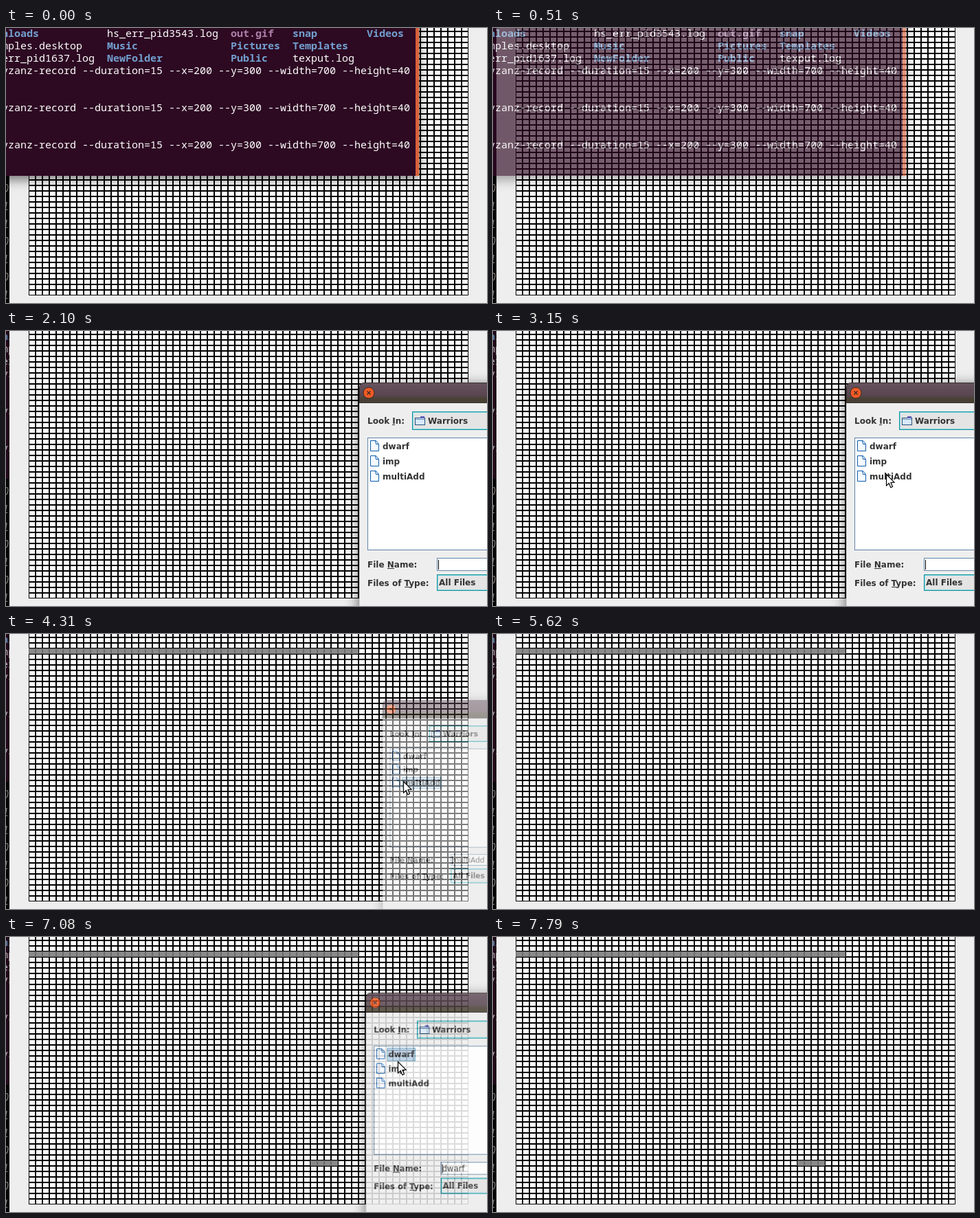
An HTML page with a canvas for the animation above (8 s loop, 700x400 px).

```html
<!DOCTYPE html>
<html lang="en">
<head>
<meta charset="utf-8">
<title>Memory grid and file chooser</title>
<style>
html, body { margin: 0; width: 100%; height: 100%; overflow: hidden; background: #eee; }
canvas { display: block; }
</style>
</head>
<body>
<canvas id="stage" width="700" height="400"></canvas>
<script>
const ctx = document.getElementById('stage').getContext('2d');
const LOOP = 8000;
const MONO = '15px "Noto Sans Mono", monospace';
const BOLD = 'bold 12px "DejaVu Sans", sans-serif';
const PLAIN = '12px "DejaVu Sans", sans-serif';

function layer(height, paint) {
  const canvas = document.createElement('canvas');
  canvas.width = 700;
  canvas.height = height;
  const g = canvas.getContext('2d');
  if (paint) paint(g);
  return canvas;
}

function rect(g, x, y, w, h, fill) {
  g.fillStyle = fill;
  g.fillRect(x, y, w, h);
}

function frame(g, x, y, w, h, line, fill) {
  rect(g, x, y, w, h, line);
  rect(g, x + 1, y + 1, w - 2, h - 2, fill);
}

function label(g, str, x, y, font, color) {
  g.font = font;
  g.fillStyle = color;
  g.fillText(str, x, y);
}

function shadow(g, color, blur, dy) {
  g.shadowColor = color;
  g.shadowBlur = blur;
  g.shadowOffsetY = dy;
}

function polygon(g, points) {
  g.beginPath();
  points.forEach(([x, y]) => g.lineTo(x, y));
  g.closePath();
}

// Terminal window; text sits on a 9 px character grid.
const DIR = '#729fcf', MEDIA = '#ad7fa8', WHITE = '#ffffff';
const COMMAND = 'yzanz-record --duration=15 --x=200 --y=300 --width=700 --height=40';
const terminalText = [
  [0, 13, 'nloads', DIR], [17, 13, 'hs_err_pid3543.log', WHITE], [37, 13, 'out.gif', MEDIA],
  [47, 13, 'snap', DIR], [59, 13, 'Videos', DIR],
  [0, 31, 'mples.desktop', WHITE], [17, 31, 'Music', DIR], [37, 31, 'Pictures', DIR], [47, 31, 'Templates', DIR],
  [0, 49, 'err_pid1637.log', WHITE], [17, 49, 'NewFolder', DIR], [37, 49, 'Public', DIR], [47, 49, 'texput.log', WHITE],
  [0, 67, COMMAND, WHITE], [0, 121, COMMAND, WHITE], [0, 175, COMMAND, WHITE]
];

const terminal = layer(400, g => {
  shadow(g, 'rgba(0,0,0,.55)', 16, 5);
  rect(g, -30, -30, 631, 245, '#2d0922');
  shadow(g, 'transparent', 0, 0);
  rect(g, 596, 0, 5, 215, '#d8603a');
  for (const [col, y, str, color] of terminalText) {
    label(g, str, -6 + col * 9, y, (color === WHITE ? '' : 'bold ') + MONO, color);
  }
});

// Grid of 10 x 8 cells, each with its own 1 px border.
const GRID_X = 33, ROW_Y = 21;

function cells(g, col, row, count, line, fill) {
  for (let i = col; i < col + count; i++) {
    frame(g, GRID_X + i * 10, ROW_Y + row * 8, 10, 8, line, fill);
  }
}

const backdrop = layer(400, g => {
  rect(g, 0, 0, 700, 400, '#000');
  ['0', '1', '1', '0', '1', '0', '1'].forEach((digit, i) => {
    label(g, digit, -5, 239 + i * 25.8, 'italic 15px "DejaVu Sans", sans-serif', '#a9a09c');
  });
  g.drawImage(terminal, 0, 0);
  shadow(g, 'rgba(0,0,0,.75)', 16, 3);
  rect(g, 5, -30, 720, 460, '#eee');
  shadow(g, 'transparent', 0, 0);
  for (let row = -3; row < 46; row++) cells(g, 0, row, 64, '#000', '#fff');
});

// File chooser
const FILES = ['dwarf', 'imp', 'multiAdd'];
const INK = '#333';

function underlined(g, before, key, after, y) {
  label(g, before + key + after, 526, y, BOLD, INK);
  const x = 526 + g.measureText(before).width;
  rect(g, Math.round(x), y + 1, Math.round(g.measureText(key).width), 1, INK);
}

function fileIcon(g, y) {
  polygon(g, [[530.5, y + .5], [538.5, y + .5], [542.5, y + 5.5], [542.5, y + 15.5], [530.5, y + 15.5]]);
  g.fillStyle = '#f6faff';
  g.fill();
  g.strokeStyle = '#0b5cad';
  g.stroke();
  g.beginPath();
  g.moveTo(537.5, y + 1);
  g.lineTo(538.5, y + 5.5);
  g.lineTo(542, y + 5.5);
  g.stroke();
}

function combo(g, x, y, h) {
  frame(g, x, y, 469, h, '#168f9c', '#7fd9e2');
  rect(g, x + 2, y + 2, 465, h - 4, '#e4e4e4');
}

function titleBar(g) {
  shadow(g, 'rgba(0,0,0,.6)', 20, 5);
  g.fillStyle = '#3c3434';
  g.beginPath();
  g.roundRect(514, 75, 558, 350, [7, 7, 0, 0]);
  g.fill();
  shadow(g, 'transparent', 0, 0);
  const shade = g.createLinearGradient(0, 76, 0, 105);
  shade.addColorStop(0, '#66525e');
  shade.addColorStop(.6, '#594650');
  shade.addColorStop(.75, '#4b4237');
  shade.addColorStop(1, '#453e30');
  g.fillStyle = shade;
  g.beginPath();
  g.roundRect(515, 76, 556, 28, [6, 6, 0, 0]);
  g.fill();
  g.fillStyle = '#f05a24';
  g.strokeStyle = '#3b2a25';
  g.beginPath();
  g.arc(528, 90, 8, 0, 7);
  g.fill();
  g.stroke();
  g.lineWidth = 1.4;
  g.beginPath();
  for (const d of [-2.5, 2.5]) {
    g.moveTo(528 - d, 87.5);
    g.lineTo(528 + d, 92.5);
  }
  g.stroke();
  g.lineWidth = 1;
}

function paintDialog(g, picked, name, caret) {
  g.clearRect(0, 0, 700, 460);
  titleBar(g);
  rect(g, 514, 105, 558, 320, '#eee');
  rect(g, 514, 105, 1, 320, '#d2d2d2');

  underlined(g, 'Look ', 'I', 'n:', 135);
  combo(g, 591, 117, 27);
  frame(g, 595, 126, 15, 11, '#26517f', '#d8e9fa');
  rect(g, 603, 124, 6, 3, '#5d5fb5');
  rect(g, 596, 128, 13, 1, '#6d92ba');
  label(g, 'Warriors', 614, 135, BOLD, INK);

  frame(g, 526, 155, 534, 164, '#5f83a6', '#fff');
  FILES.forEach((file, i) => {
    const y = 159 + i * 22;
    g.font = BOLD;
    if (file === picked) {
      frame(g, 546, y - 1, g.measureText(file).width + 4, 20, '#63a5bd', '#b8cfe5');
    }
    fileIcon(g, y);
    label(g, file, 548, y + 13, BOLD, INK);
  });

  underlined(g, 'File ', 'N', 'ame:', 344);
  frame(g, 627, 330, 433, 19, '#6286a8', '#fff');
  label(g, name, 629, 344, PLAIN, INK);
  if (caret) rect(g, 629, 333, 1, 14, '#000');

  underlined(g, 'Files of ', 'T', 'ype:', 371);
  combo(g, 627, 354, 24);
  label(g, 'All Files', 630, 370, BOLD, INK);
}

const dialog = layer(460);
const dialogCtx = dialog.getContext('2d');

// Each showing: time and how far the window has gone (1 = gone).
const showings = [
  { file: 'multiAdd', pick: 3900, name: 4020, blink: 1925,
    steps: [[1970, .8], [2010, .5], [2055, .2], [2100, 0], [4260, .13], [4310, .46], [4370, .8], [4410, 1]] },
  { file: 'dwarf', pick: 6700, name: 6860, blink: 5640,
    steps: [[5660, .8], [5700, .5], [5740, .2], [5780, 0], [7040, .13], [7090, .46], [7140, .8], [7180, 1]] }
];

function held(steps, t, initial) {
  let value = initial;
  for (const [at, v] of steps) if (t >= at) value = v;
  return value;
}

function drawDialog(t, s) {
  const gone = held(s.steps, t, 1);
  if (gone === 1) return;
  const caret = Math.floor((t - s.blink) / 500) % 2 === 0;
  paintDialog(dialogCtx, t >= s.pick && s.file, t >= s.name ? s.file : '', caret);
  const scale = 1 - .265 * gone;
  ctx.save();
  ctx.globalAlpha = 1 - 1.1 * gone;
  ctx.translate(793, 250);
  ctx.scale(scale, scale);
  ctx.drawImage(dialog, -793, -250);
  ctx.restore();
}

// Pointer tip: time, x, y
const path = [
  [0, 425, -30], [2460, 425, -24], [2800, 520, 120], [3130, 572, 208], [3430, 572, 208],
  [3550, 578, 214], [4400, 578, 214], [4670, 425, -24], [5840, 425, -24], [6100, 520, 100],
  [6360, 577, 174], [6430, 577, 176], [6640, 570, 181], [7550, 570, 181], [7780, 440, 30],
  [7781, 425, -30], [LOOP, 425, -30]
];

function drawPointer(t) {
  const i = path.findIndex(p => p[0] > t);
  const [t0, x0, y0] = path[i - 1], [t1, x1, y1] = path[i];
  const k = (t - t0) / (t1 - t0);
  ctx.save();
  ctx.translate(Math.round(x0 + (x1 - x0) * k) + .5, Math.round(y0 + (y1 - y0) * k) + .5);
  polygon(ctx, [[0, 0], [0, 16.5], [3.8, 13], [6.3, 19.2], [9, 18], [6.5, 12], [11.5, 11.7]]);
  ctx.fillStyle = '#fff';
  ctx.strokeStyle = '#000';
  ctx.lineWidth = 1.2;
  ctx.fill();
  ctx.stroke();
  ctx.restore();
}

function draw(t) {
  ctx.drawImage(backdrop, 0, 0);
  if (t >= 4260) cells(ctx, 0, 0, 48, '#6c6c6c', '#8a8a8a');
  if (t >= 7040) cells(ctx, 41, 38, 4, '#6c6c6c', '#8a8a8a');
  ctx.globalAlpha = held([[510, .65], [580, .3], [650, 0]], t, 1);
  ctx.drawImage(terminal, 0, 0);
  ctx.globalAlpha = 1;
  showings.forEach(s => drawDialog(t, s));
  drawPointer(t);
}

const start = performance.now();
function tick() {
  draw((performance.now() - start) % LOOP);
  requestAnimationFrame(tick);
}
tick();
</script>
</body>
</html>
```
